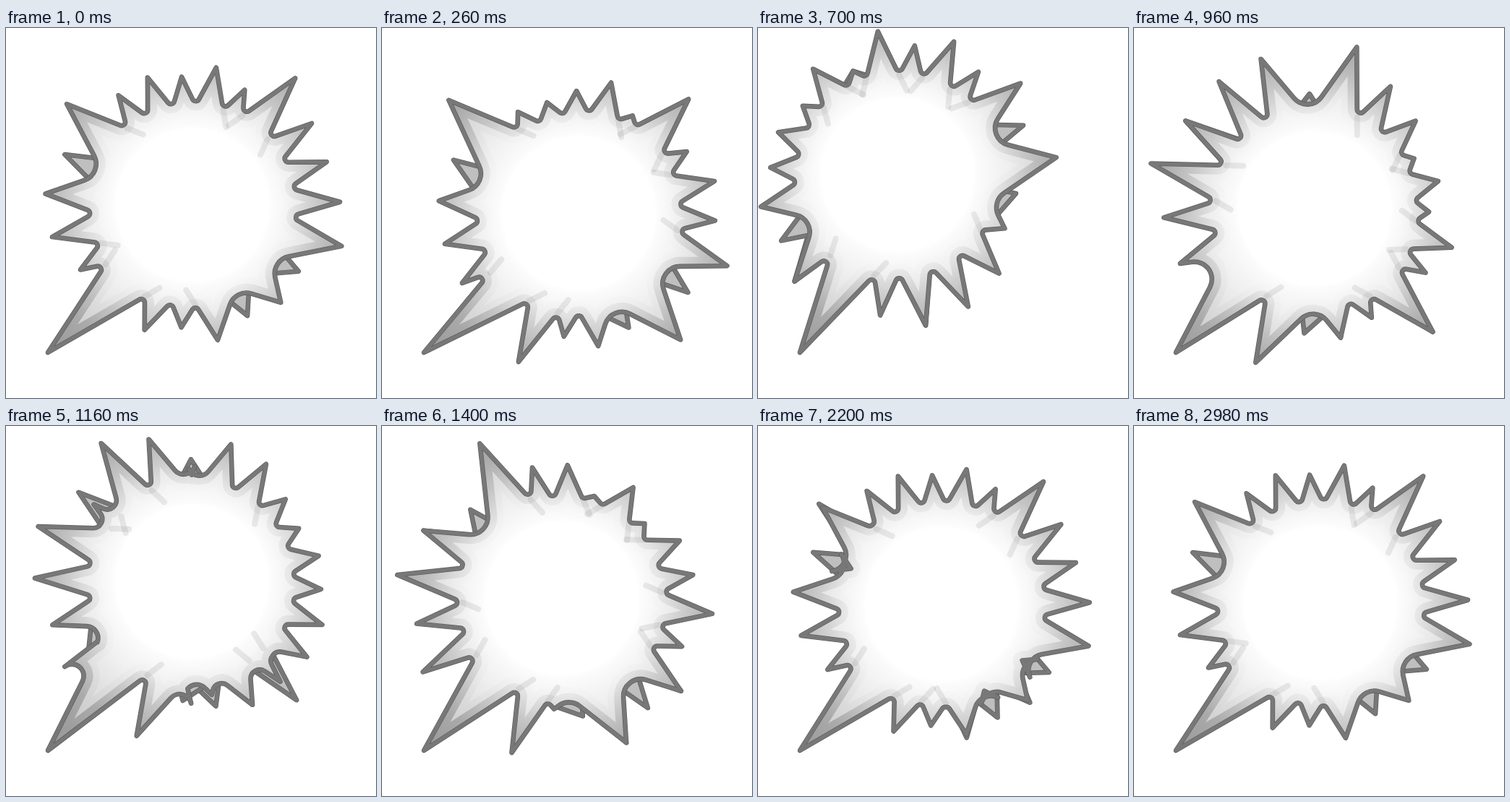
An HTML page with a canvas for the animation above (3000 ms loop, 512 px wide and 512 px high).

```html
<!DOCTYPE html>
<html lang="en">
<head>
<meta charset="utf-8">
<title>Spiky speech bubble</title>
<style>
html, body { margin: 0; width: 100%; height: 100%; overflow: hidden; background: #fff; }
canvas { display: block; width: 512px; height: 512px; }
</style>
</head>
<body>
<canvas id="stage" width="512" height="512"></canvas>
<script>
const ctx = document.getElementById("stage").getContext("2d");
const LOOP = 3000;
const COUNT = 22; // spikes, with the tail as number 0
const TAIL = [58, 449];

// Spikes fan out clockwise from the tail. Every fifth bearing is given
// (degrees from the top), the others lie evenly between.
// Spikes named in `behind` stand behind their neighbours.
function pose(centre, bearings, lengths, behind) {
  const front = lengths.map((_, i) => behind.includes(i + 1) ? 0 : 1);
  return [...centre, ...bearings, ...lengths, ...front];
}

const rest = pose([258, 245], [240, 326, 399, 482, 561],
  [179, 199, 204, 190, 223, 183, 187, 178, 193, 175, 226, 200, 195, 204, 214, 173, 182, 171, 190, 170, 185],
  [4, 16, 18]);
const lean = pose([272, 256], [239, 329, 404, 486, 562],
  [188, 190, 194, 188, 238, 163, 159, 169, 186, 154, 219, 172, 193, 189, 218, 187, 225, 173, 186, 172, 222],
  [4, 16, 18]);
const rise = pose([193, 203], [224, 306, 383, 459, 547],
  [205, 185, 194, 176, 175, 162, 187, 156, 200, 180, 200, 181, 212, 187, 221, 166, 166, 196, 207, 212, 196],
  [2, 14, 16]);
const flare = pose([250, 250], [229, 323, 409, 480, 561],
  [150, 201, 209, 235, 216, 220, 220, 159, 231, 199, 185, 154, 175, 158, 197, 177, 236, 170, 182, 173, 228],
  [1, 8, 20]);
const twist = pose([249, 238], [242, 332, 408, 488, 558],
  [218, 204, 230, 213, 176, 242, 185, 184, 148, 182, 154, 181, 184, 209, 179, 209, 193, 219, 166, 154, 225],
  [5, 17, 19]);

// A pose between two others, its centre moved by dx, dy.
function blend(a, b, k, dx, dy) {
  const p = a.map((v, i) => v + (b[i] - v) * k);
  p[0] += dx;
  p[1] += dy;
  return p;
}

const keys = [
  [0, rest], [260, lean], [500, blend(lean, lean, 0, 35, 24)], [700, rise], [960, flare],
  [1180, blend(flare, twist, .45, 8, -30)], [1400, twist],
  [1820, blend(twist, rest, .6, 30, 4)], [2200, blend(rest, twist, .08, -3, 2)],
  [2720, rest], [LOOP, rest]
];

// Tangent of one value at key k, flat at turning points.
function slope(k, i) {
  if (k === 0 || k === keys.length - 1) return 0;
  const [t0, a] = keys[k - 1], [t1, b] = keys[k], [t2, c] = keys[k + 1];
  const s0 = (b[i] - a[i]) / (t1 - t0), s1 = (c[i] - b[i]) / (t2 - t1);
  return s0 * s1 <= 0 ? 0 : 2 * s0 * s1 / (s0 + s1);
}

function poseAt(t) {
  let k = 0;
  while (k < keys.length - 2 && t >= keys[k + 1][0]) k++;
  const [t0, a] = keys[k], [t1, b] = keys[k + 1];
  const span = t1 - t0, u = (t - t0) / span, e = u * u * (3 - 2 * u);
  const m0 = u * (1 - u) * (1 - u) * span, m1 = u * u * (u - 1) * span;
  return a.map((v, i) => v + (b[i] - v) * e + m0 * slope(k, i) + m1 * slope(k + 1, i));
}

const clamp = (v, lo, hi) => Math.min(hi, Math.max(lo, v));
const mix = (p, q, k) => [p[0] + (q[0] - p[0]) * k, p[1] + (q[1] - p[1]) * k];

function polar([x, y], deg, r) {
  const a = deg * Math.PI / 180;
  return [x + r * Math.sin(a), y - r * Math.cos(a)];
}

// Turns a pose into tips and the valleys that follow them.
function layout(p) {
  const centre = p.slice(0, 2), bearings = p.slice(2, 7);
  const lengths = p.slice(7, 6 + COUNT), front = p.slice(6 + COUNT);
  const dx = TAIL[0] - centre[0], dy = TAIL[1] - centre[1];
  const spikes = [{
    deg: Math.atan2(dx, -dy) * 180 / Math.PI + 360,
    len: Math.hypot(dx, dy), w: 1, tip: TAIL
  }];
  lengths.forEach((len, i) => {
    const k = Math.min(3, Math.floor(i / 5));
    const deg = bearings[k] + (bearings[k + 1] - bearings[k]) * (i / 5 - k);
    spikes.push({ deg, len, w: front[i], tip: polar(centre, deg, len) });
  });

  // Wide gaps cut deeper; a valley leans towards the shorter spike.
  function valley(i, j) {
    const a = spikes[i], b = spikes[j % COUNT];
    const gap = b.deg + (j >= COUNT ? 360 : 0) - a.deg;
    const diff = a.len - b.len;
    const at = .5 + clamp(diff * .0032, -.22, .22);
    const r = 142 - .4 * gap + Math.min(10, Math.abs(diff) * .12);
    return polar(centre, a.deg + gap * at, r);
  }

  const valleys = spikes.map((_, i) => valley(i, i + 1));
  for (let i = 1; i < COUNT; i++) {
    const shared = valley(i - 1, i + 1), w = spikes[i].w;
    valleys[i - 1] = mix(shared, valleys[i - 1], w);
    valleys[i] = mix(shared, valleys[i], w);
  }
  return { centre, spikes, valleys };
}

function radial([x, y], stops) {
  const g = ctx.createRadialGradient(x, y, 0, x, y, 300);
  for (const [r, colour] of stops) g.addColorStop(r / 300, colour);
  return g;
}

function stroke(path, width, style) {
  ctx.lineWidth = width;
  ctx.strokeStyle = style;
  ctx.stroke(path);
}

function outline(path) {
  stroke(path, 6.6, "#5e5e5e");
  stroke(path, 5.2, "#787878");
}

function backSpike(tip, base) {
  const dx = base[0] - tip[0], dy = base[1] - tip[1];
  const k = 21 / (Math.hypot(dx, dy) || 1);
  const path = new Path2D();
  path.moveTo(base[0] - dy * k, base[1] + dx * k);
  path.lineTo(...tip);
  path.lineTo(base[0] + dy * k, base[1] - dx * k);
  ctx.fillStyle = "#bfbfbf";
  ctx.fill(path);
  outline(path);
}

function bodyPath(spikes, valleys) {
  const pts = [];
  spikes.forEach(({ tip, w }, i) => {
    if (w < .02) return;
    const before = valleys[(i + COUNT - 1) % COUNT];
    const after = spikes[(i + 1) % COUNT].w;
    pts.push({ p: mix(mix(before, valleys[i], .5), tip, w), r: 0 });
    pts.push({ p: valleys[i], r: 24 - 19 * Math.min(w, after) });
  });
  const path = new Path2D();
  path.moveTo(...pts[0].p);
  pts.slice(1).forEach(({ p, r }, i) => {
    if (r) path.arcTo(...p, ...pts[(i + 2) % pts.length].p, r);
    else path.lineTo(...p);
  });
  path.closePath();
  return path;
}

// The edge of a long spike runs on faintly past the valley of a shorter one.
function fold(a, b, valley) {
  if (Math.min(a.w, b.w) < .5 || Math.abs(a.len - b.len) < 18) return;
  const { tip } = a.len > b.len ? a : b;
  const len = Math.hypot(valley[0] - tip[0], valley[1] - tip[1]);
  const path = new Path2D();
  path.moveTo(...valley);
  path.lineTo(...mix(tip, valley, 1 + 24 / len));
  stroke(path, 8, "rgba(90,90,90,.12)");
}

function draw(t) {
  const { centre, spikes, valleys } = layout(poseAt(t));
  const fill = radial(centre, [[0, "#fff"], [105, "#fff"], [112, "#fbfbfb"],
    [150, "#f0f0f0"], [190, "#e2e2e2"], [260, "#d0d0d0"]]);
  const soft = radial(centre, [[112, "rgba(140,140,140,0)"], [220, "rgba(140,140,140,.1)"]]);
  const band = radial(centre, [[115, "#f6f6f6"], [145, "#dfdfdf"], [180, "#c4c4c4"],
    [220, "#aaa"], [270, "#9c9c9c"]]);

  ctx.fillStyle = "#fff";
  ctx.fillRect(0, 0, 512, 512);
  ctx.lineJoin = ctx.lineCap = "round";

  spikes.forEach(({ tip, w }, i) => {
    if (w < 1) backSpike(tip, mix(valleys[i - 1], valleys[i], .5));
  });

  const body = bodyPath(spikes, valleys);
  ctx.save();
  ctx.clip(body);
  ctx.fillStyle = fill;
  ctx.fill(body);
  stroke(body, 44, soft);
  stroke(body, 26, band);
  spikes.forEach((s, i) => fold(s, spikes[(i + 1) % COUNT], valleys[i]));
  ctx.restore();
  outline(body);
}

const start = performance.now();
function tick() {
  draw((performance.now() - start) % LOOP);
  requestAnimationFrame(tick);
}
tick();
</script>
</body>
</html>
```
